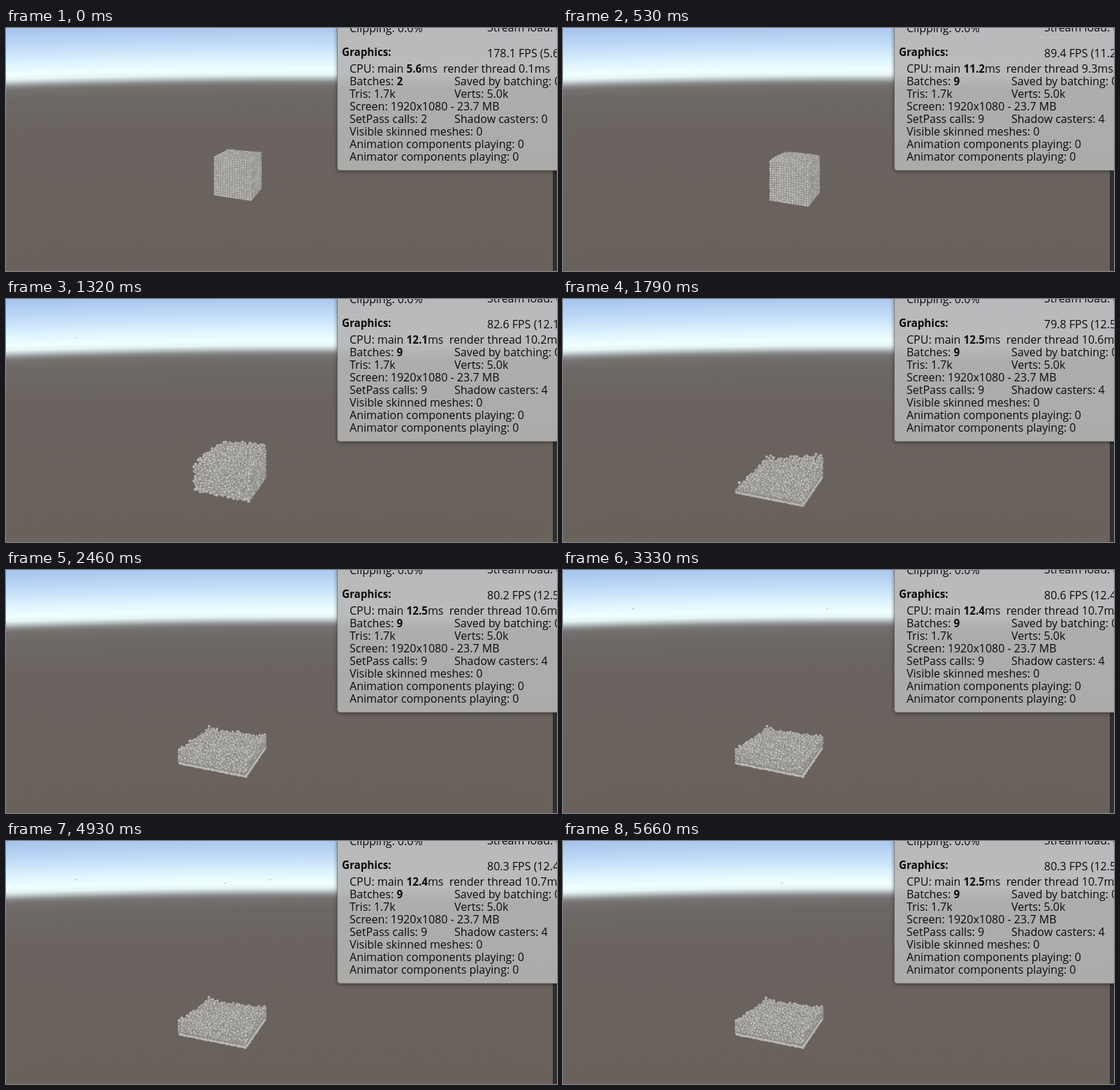
An HTML page with a canvas that plays this animation: 789 by 348 pixels, repeating every 5730 ms.

```html
<!DOCTYPE html>
<html lang="en">
<head>
<meta charset="utf-8">
<title>Particle fluid</title>
<style>
  html, body { margin: 0; width: 100%; height: 100%; overflow: hidden; background: #69615c; }
  canvas { display: block; }
</style>
</head>
<body>
<canvas id="stage" width="789" height="348"></canvas>
<script>
const LOOP = 5730, START = 260, STEP = 600 / 9;
const canvas = document.getElementById('stage');
const ctx = canvas.getContext('2d');

const clamp = (x, lo = 0, hi = 1) => Math.min(hi, Math.max(lo, x));
const mix = (a, b, p) => a + (b - a) * p;
const progress = (t, from, to) => clamp((t - from) / (to - from));
const smooth = p => p * p * (3 - 2 * p);

let seed = 7;
const random = () => (seed = seed * 16807 % 2147483647) / 2147483647;
const spread = () => random() * 2 - 1;

// Tank coordinates: u along the front edge, v into the depth, h upwards.
function project(u, v, h) {
  const z = 1 + 0.096 * (1 - u) + 0.233 * v;
  const x = -51 - 110 * (1 - u) + 22.6 * v;
  return { x: 394 + x / z, y: 80 + (217 - h) / z, z };
}

const particles = [];
const NX = 16, NY = 18;
for (let i = 0; i < NX; i++)
  for (let j = 0; j < NX; j++)
    for (let k = 0; k < NY; k++)
      particles.push({
        a: i / (NX - 1), b: j / (NX - 1), c: k / (NY - 1), top: k === NY - 1,
        du: spread(), dv: spread(), dh: spread(), hop: random() ** 2,
        phase: random() * 6.28, shade: Math.floor(random() * 3)
      });

const sprites = [['#c9c8c5', '#b4b3b0', '#858380'],
                 ['#c2c1be', '#adaca9', '#807e7b'],
                 ['#bebdba', '#a8a7a4', '#7b7976']].map(colors => {
  const sprite = document.createElement('canvas');
  sprite.width = sprite.height = 24;
  const c = sprite.getContext('2d');
  const g = c.createRadialGradient(11, 8, 1, 12, 12, 12);
  colors.forEach((color, i) => g.addColorStop([0, 0.6, 1][i], color));
  c.fillStyle = g;
  c.arc(12, 12, 12, 0, 7);
  c.fill();
  return sprite;
});

const blockShape = p => [0.385 + 0.555 * p.a, 0.41 + 0.55 * p.b, 34 + 61 * p.c];

function landedShape(p) {
  const edge = (2 * p.a - 1) ** 4 + (2 * p.b - 1) ** 4;
  return [0.35 + 0.65 * p.a, 0.26 + 0.74 * p.b, p.c * (82 - 8 * edge)];
}

const slopeShape = p => [p.a, p.b, p.c * (3 + p.b * mix(13, 36, p.a))];

function poolShape(p) {
  const corner = (2 * p.a - 1) ** 8 * (2 * p.b - 1) ** 8;
  return [p.a, p.b, p.c * (20 + 3 * corner)];
}

function place(p, t) {
  const fall = progress(t, START, 830) ** 2;
  const collapse = smooth(progress(t, 830, 1790));
  const settle = smooth(progress(t, 1790, 2460));
  const [from, to, amount] =
    t < 830 ? [blockShape, landedShape, fall] :
    t < 1790 ? [landedShape, slopeShape, collapse] :
    [slopeShape, poolShape, settle];
  const end = to(p);
  let [u, v, h] = from(p).map((x, i) => mix(x, end[i], amount));

  const loose = fall * mix(0.35, 1, collapse);
  const drift = 0.012 * settle * Math.sin(t / 500 + p.phase);
  u = clamp(u + loose * (0.045 * p.du + drift), 0.008, 1);
  v = clamp(v + loose * (0.045 * p.dv + drift), 0.008, 1);
  h += p.dh * loose * mix(1.6, 0.8, settle);
  if (p.top) {
    const wave = 0.7 + 0.3 * Math.sin(t / 260 + p.phase);
    const calm = mix(1, 0.45, progress(t, 2000, 3600));
    h += p.hop * wave * calm * (1 + 7 * loose);
  }
  return Object.assign(project(u, v, Math.max(h, 1)), { size: mix(4.3, 5.6, fall), shade: p.shade });
}

function drawRim(t) {
  ctx.globalAlpha = progress(t, 1300, 1750);
  for (const [h, width, color] of [[4.6, 1, '#827f7c'], [1, 2, '#bdbcb9']]) {
    ctx.beginPath();
    for (const [u, v] of [[0, 0], [1, 0], [1, 1]]) {
      const q = project(u, v, h);
      ctx.lineTo(q.x, q.y);
    }
    ctx.strokeStyle = color;
    ctx.lineWidth = width;
    ctx.stroke();
  }
  ctx.globalAlpha = 1;
}

function drawBackground() {
  // A very large circle gives the horizon its slight curve.
  const R = 13000, top = 77, cy = top + R, depth = 300, height = 100;
  const g = ctx.createRadialGradient(430, cy, R - depth, 430, cy, R + height);
  const stops = [[-10, '#a3c0ec'], [0, '#abc8ef'], [25, '#c5dff8'], [45, '#def4ff'], [60, '#f0ffff'],
                 [67, '#e6f3f5'], [72, '#b9c2c5'], [77, '#8a8b8c'], [82, '#747170'],
                 [95, '#6d6866'], [150, '#6a635f'], [340, '#69615c']];
  for (const [y, color] of stops) g.addColorStop((top + depth - y) / (depth + height), color);
  ctx.fillStyle = g;
  ctx.fillRect(0, 0, 789, 348);
}

// Time, frame rate, main thread ms, render thread ms.
const stats = [
  [0, '178.1', '5.6', '0.1'], [460, '89.4', '11.2', '9.3'], [860, '82.6', '12.1', '10.2'],
  [1460, '79.8', '12.5', '10.6'], [2190, '80.2', '12.5', '10.6'], [2990, '80.6', '12.4', '10.7'],
  [3790, '80.4', '12.4', '10.6'], [4790, '80.3', '12.4', '10.7'], [5260, '80.3', '12.5', '10.7']
];
const REGULAR = '16px "Open Sans", "Noto Sans", sans-serif';
const BOLD = 'bold 15.2px "Open Sans", "Noto Sans", sans-serif';

function write(x, y, text, font = REGULAR) {
  ctx.font = font;
  ctx.fillText(text, x, y);
  return x + ctx.measureText(text).width;
}

function drawPanel(t) {
  ctx.fillStyle = '#302f2f';
  ctx.fillRect(783, 200, 6, 148);

  const g = ctx.createLinearGradient(0, 0, 0, 204);
  g.addColorStop(0, '#b7b9bb');
  g.addColorStop(0.32, '#b9bbbc');
  g.addColorStop(0.42, '#aeadad');
  g.addColorStop(1, '#acabaa');
  ctx.save();
  ctx.shadowColor = 'rgba(0,0,0,.5)';
  ctx.shadowBlur = 6;
  ctx.shadowOffsetY = 1;
  ctx.beginPath();
  ctx.roundRect(474.5, -20, 340, 224, 4);
  ctx.fillStyle = g;
  ctx.fill();
  ctx.restore();
  ctx.strokeStyle = 'rgba(90,90,90,.55)';
  ctx.lineWidth = 1;
  ctx.stroke();

  const [time, fps, main, render] = stats.findLast(s => s[0] <= t);
  const idle = time === 0;
  const calls = idle ? '2' : '9';
  ctx.fillStyle = '#0b0b0b';
  write(492, 6, 'Clipping: 0.0%');
  write(689, 5, 'Stream load: 0.0%');
  write(481, 40, 'Graphics:', BOLD);
  write(689, 42, `${fps} FPS (${main}ms)`);
  let x = write(492, 64, 'CPU: main ');
  x = write(x, 64, main, BOLD);
  write(x, 64, `ms  render thread ${render}ms`);
  write(write(492, 82, 'Batches: '), 82, calls, BOLD);
  write(642, 82, 'Saved by batching: 0');
  write(492, 100, 'Tris: 1.7k');
  write(642, 100, 'Verts: 5.0k');
  write(492, 118, 'Screen: 1920x1080 - 23.7 MB');
  write(492, 136, `SetPass calls: ${calls}`);
  write(642, 136, `Shadow casters: ${idle ? 0 : 4}`);
  write(492, 154, 'Visible skinned meshes: 0');
  write(492, 172, 'Animation components playing: 0');
  write(492, 190, 'Animator components playing: 0');
}

// x, y, from, to
const specks = [[100, 55, 1060, 1590], [100, 55, 2920, 5260], [42, 55, 3390, 4720],
                [313, 60, 3520, LOOP], [378, 55, 2990, 5330]];

function draw(t) {
  drawBackground();
  ctx.fillStyle = '#5d6468';
  for (const [x, y, from, to] of specks)
    if (t >= from && t < to) ctx.fillRect(x, y, 1, 1);

  const placed = particles.map(p => place(p, t)).sort((p, q) => q.z - p.z || q.y - p.y);
  for (const { x, y, z, size, shade } of placed) {
    const d = size / z;
    ctx.drawImage(sprites[shade], x - d / 2, y - d / 2, d, d);
  }
  drawRim(t);
  drawPanel(t);
}

let shown = -1;
function tick() {
  const t = performance.now() % LOOP;
  const step = t < START ? 0 : START + Math.floor((t - START) / STEP + 0.01) * STEP;
  if (step !== shown) draw(shown = step);
  requestAnimationFrame(tick);
}
tick();
</script>
</body>
</html>
```
